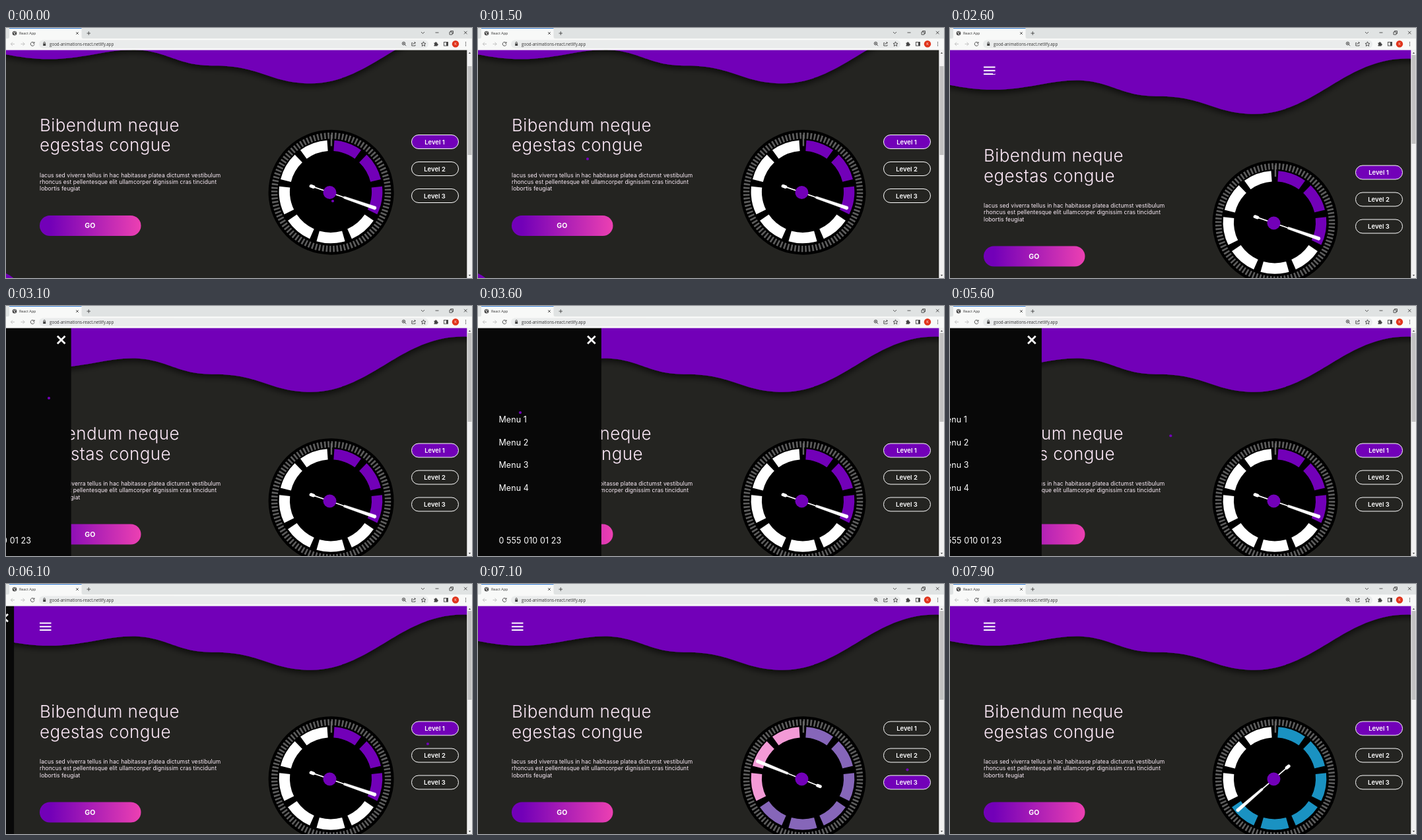
An HTML page for the animation above (8000 ms loop, 706 px wide and 380 px high).

```html
<!DOCTYPE html>
<html lang="en">
<head>
<meta charset="utf-8">
<title>React App</title>
<style>
  html, body { margin: 0; width: 100%; height: 100%; overflow: hidden; background: #242421; }
  svg { display: block; width: 706px; height: 380px; font-family: Inter, "Open Sans", sans-serif; }
  .ui { font-family: "Open Sans", "Noto Sans", sans-serif; }
  .line { fill: none; stroke: #444; stroke-width: .9; }
  .mid { text-anchor: middle; fill: #fff; }
</style>
</head>
<body>
<svg viewBox="0 0 706 380">
  <defs>
    <linearGradient id="pink">
      <stop offset=".1" stop-color="#7200b8"/>
      <stop offset="1" stop-color="#ec40b2"/>
    </linearGradient>
    <filter id="shade" x="-5%" y="-5%" width="110%" height="140%">
      <feDropShadow dx="0" dy="5" stdDeviation="4" flood-color="#000" flood-opacity=".6"/>
    </filter>
  </defs>
  <rect width="706" height="380" fill="#242421"/>

  <g id="page">
    <path filter="url(#shade)" fill="#7200b8" transform="translate(0 .7)" d="M-10 20V84L0 86C22 90 45 94 75 93C125 91 158 77 200 79C245 82 262 103 312 103C385 102 400 130 462 130C555 129 600 42 699 46L716 49V20Z"/>
    <path fill="#7200b8" d="M0 419.500Q8 423 13 428H0Z"/>
    <path stroke="#fff" stroke-width="2" d="M51 59.500H68.500M51 64.700H68.500M51 70H68.500"/>
    <g fill="#fde9f8" font-size="26" font-weight="300" letter-spacing=".4">
      <text x="51" y="203">Bibendum neque</text>
      <text x="51" y="233.500">egestas congue</text>
    </g>
    <g fill="#fdeffa" font-size="8.5" letter-spacing=".07">
      <text x="51" y="273">lacus sed viverra tellus in hac habitasse platea dictumst vestibulum</text>
      <text x="51" y="283.400">rhoncus est pellentesque elit ullamcorper dignissim cras tincidunt</text>
      <text x="51" y="293.800">lobortis feugiat</text>
    </g>
    <rect x="51" y="331.500" width="153.500" height="31" rx="15.500" fill="url(#pink)"/>
    <text class="mid" x="127.300" y="350.900" font-size="10.500" font-weight="700">GO</text>

    <circle cx="492.600" cy="296.200" r="95"/>
    <circle cx="492.600" cy="296.200" r="86" fill="none" stroke="#5c5c5c" stroke-width="9.500" pathLength="200" stroke-dasharray="1 1"/>
    <path d="M493 208.500V226" stroke="#666" stroke-width="2.400"/>
    <g id="segments" fill="none" stroke-width="16.300"></g>
    <g id="needle" stroke="#fff" stroke-linecap="round">
      <path d="M0 30V26" stroke-width="5"/>
      <path d="M0 28V-24" stroke-width="1.700"/>
      <path d="M-1.600 -23L-2.500 -73Q0 -76 2.500 -73L1.600 -23Z" fill="#fff" stroke-width=".5"/>
    </g>
    <circle cx="490.500" cy="296.500" r="10" fill="#7200b8"/>
    <g id="levels" font-size="9.500" font-weight="600"></g>
  </g>

  <g id="menu" fill="#fff" font-size="12.500">
    <rect y="33" width="191.500" height="347" fill="#080808"/>
    <path d="M170.700 45.700L182.300 57.300M182.300 45.700L170.700 57.300" stroke="#fff" stroke-width="2.800"/>
    <g id="items" letter-spacing=".1"></g>
    <text x="36" y="360.600" letter-spacing=".1">0 555 010 01 23</text>
  </g>

  <g id="cursor">
    <circle r="2.100" fill="#7200b8"/>
    <text id="hint" x="4" y="5.400" font-size="6.400" fill="#fff">GO</text>
  </g>

  <g class="ui">
    <rect width="706" height="33.600" fill="#f8f9f8"/>
    <rect width="706" height="16" fill="#e0e3e3"/>
    <path d="M3 16Q5 16 5 13V0H114.500V13Q114.500 16 117 16Z" fill="#f8f9f8"/>
    <path d="M5 .5H114.500" stroke="#3b82d8"/>
    <circle cx="13" cy="8" r="3.300" fill="#444"/>
    <path d="M11 6.500L13 7.200L12.500 9L14.500 10M13.500 5.500L15 7" stroke="#fff" stroke-width=".9" fill="none"/>
    <text x="20" y="10" font-size="5.400" fill="#333">React App</text>
    <path class="line" d="M106.200 6.200L109.800 9.800M109.800 6.200L106.200 9.800M122.500 8H128M125.250 5.200V10.700"/>
    <path class="line" d="M629 6L631.500 8.500L634 6M650.500 7H655.500M672 6H676V10H672ZM673.500 6V4.500H677.500V8.500H676M694 4.800L698.500 9.300M698.500 4.800L694 9.300"/>
    <path class="line" style="stroke:#bbb" d="M13 24.300H7.500M10 21.600L7.300 24.300L10 27M22.500 24.300H28M25.500 21.600L28.200 24.300L25.500 27"/>
    <path class="line" d="M42.300 22.400A2.900 2.900 0 1 0 43 24.700M43 21V23.200H40.700"/>
    <rect x="50" y="18.300" width="590" height="12.400" rx="6.200" fill="#eaecec"/>
    <rect x="56.200" y="23.500" width="4" height="3.500" fill="#444"/>
    <path class="line" d="M57 23.500V22.500A1.200 1.200 0 0 1 59.400 22.500V23.500"/>
    <text x="66" y="26.500" font-size="6.200" fill="#333">good-animations-react.netlify.app</text>
    <circle class="line" cx="602.500" cy="23.500" r="2.300"/>
    <path class="line" d="M604.200 25.200L606.200 27.200M601.300 23.500H603.700M602.500 22.300V24.700"/>
    <path class="line" d="M616 22.500H614.800V27H620V25.500M616.500 25Q617 22.500 620 22.500M618.800 21L620.500 22.500L618.800 24"/>
    <path class="line" d="M632.500 20.800L633.500 23.200L636 23.400L634.100 25L634.700 27.500L632.500 26.200L630.300 27.500L630.900 25L629 23.400L631.500 23.200Z"/>
    <path fill="#444" d="M648.500 22.500H650A1.300 1.300 0 0 1 652.600 22.500H653.500V24A1.300 1.300 0 0 1 653.500 26.600V27.500H648.500V26A1.200 1.200 0 0 0 648.500 23.800Z"/>
    <rect class="line" x="663.500" y="21.500" width="6" height="5.500"/>
    <path d="M667 21.500H669.500V27H667Z" fill="#444"/>
    <circle cx="681" cy="24.200" r="5.200" fill="#e0341c"/>
    <text class="mid" x="681" y="26.300" font-size="5.600">K</text>
    <path d="M696.500 21.700V27.500" stroke="#444" stroke-width="1.400" stroke-linecap="round" stroke-dasharray="0 2.500"/>
    <rect x="698.300" y="33" width="7.700" height="347" fill="#f1f1f1"/>
    <path d="M700.800 39L702.500 36.800L704.200 39ZM700.800 375L702.500 377.200L704.200 375Z" fill="#555"/>
    <rect id="thumb" x="699.500" width="6" height="135" fill="#c1c1c1"/>
  </g>
</svg>
<script>
const $ = id => document.getElementById(id);
const PURPLE = '#7200b8';
const COLORS = ['', PURPLE, '#1a92c2', '#e83eb0'];
const clamp = v => Math.min(1, Math.max(0, v));
const mix = (a, b, k) => `color-mix(in srgb, ${b} ${k * 100}%, ${a})`;
const repeat = (n, make) => Array.from({ length: n }, (_, i) => make(i)).join('');

const bezier = (u, a, b) => 3 * u * (1 - u) ** 2 * a + 3 * u * u * (1 - u) * b + u ** 3;

// the CSS "ease" curve
function ease(x) {
  x = clamp(x);
  if (x === 0 || x === 1) return x;
  let lo = 0, hi = 1;
  for (let i = 0; i < 20; i++) {
    const mid = (lo + hi) / 2;
    if (bezier(mid, .25, .25) < x) lo = mid; else hi = mid;
  }
  return bezier(lo, .1, 1);
}

// time, x, y
const PATH = [
  [0, 495, 263], [100, 494, 264], [400, 340, 300], [700, 200, 306], [1000, 160, 266],
  [1500, 166, 199], [1850, 60, 62], [2500, 67, 69], [2800, 66, 66], [3100, 65, 140],
  [3600, 64, 162], [3900, 63, 173], [4150, 62, 207], [4400, 62, 242], [4650, 64, 277],
  [4750, 64, 277], [4950, 62, 207], [5080, 90, 170], [5350, 286, 190], [5450, 286, 190],
  [6100, 639, 243], [6350, 648, 262], [6450, 648, 262], [6800, 650, 302], [6950, 650, 302],
  [7250, 651, 263], [7400, 651, 263], [7800, 659, 227], [8000, 659, 227]
];
// time, level
const CLICKS = [[-1000, 1], [6420, 2], [6880, 3], [7340, 2], [7880, 1]];
const LAG = 120;

$('segments').innerHTML = repeat(9, i =>
  `<circle r="70.200" pathLength="360" stroke-dasharray="32 328" transform="translate(492 295.400) rotate(${i * 40 - 86})"/>`);
$('levels').innerHTML = repeat(3, i =>
  `<rect x="614.500" y="${209 + i * 41}" width="71" height="21" rx="10.500" stroke="#fff"/>
   <text class="mid" x="649.500" y="${223 + i * 41}">Level ${i + 1}</text>`);
const itemY = i => 177 + i * 34.6;
$('items').innerHTML = repeat(4, i => `<text x="36" y="${itemY(i)}">Menu ${i + 1}</text>`);

const segments = [...$('segments').children];
const buttons = $('levels').querySelectorAll('rect');
const items = [...$('items').children];

function pointer(t) {
  const n = PATH.findIndex(p => p[0] > t);
  const [t0, x0, y0] = PATH[n - 1], [t1, x1, y1] = PATH[n];
  const u = (t - t0) / (t1 - t0), k = u * u * (3 - 2 * u);
  return [x0 + (x1 - x0) * k, y0 + (y1 - y0) * k];
}

function drawGauge(t) {
  const last = time => CLICKS.filter(c => c[0] <= time).length - 1;
  const active = CLICKS[last(t)][1];
  buttons.forEach((b, i) => b.setAttribute('fill', i + 1 === active ? PURPLE : '#242421'));

  const n = last(t - LAG), [start, to] = CLICKS[n];
  const from = CLICKS[Math.max(0, n - 1)][1];
  const k = ease((t - LAG - start) / 330);
  const color = (level, i) => i < level * 3 ? COLORS[level] : '#ffffff';
  segments.forEach((s, i) => s.style.stroke = mix(color(from, i), color(to, i), k));
  const angle = 109 + 120 * (from + (to - from) * k - 1);
  $('needle').setAttribute('transform', `translate(490.500 296.500) rotate(${angle})`);
}

function draw(t) {
  const scroll = 1 - ease((t - 2050) / 300);
  $('page').setAttribute('transform', `translate(0 ${-46.5 * scroll})`);
  $('thumb').setAttribute('y', 41 + 17 * scroll);

  const open = ease((t - 2800) / 1000) - ease((t - 5410) / 1000);
  $('menu').setAttribute('transform', `translate(${191.5 * (open - 1)} 0)`);

  const [x, y] = pointer(t);
  $('cursor').setAttribute('transform', `translate(${x} ${y})`);
  let hover = 0;
  items.forEach((item, i) => {
    const near = x < 90 && open > .9 ? clamp((10 - Math.abs(y - itemY(i) + 4.5)) / 5) : 0;
    hover = Math.max(hover, near);
    item.setAttribute('transform', `rotate(${-10 * near} 36 ${itemY(i)})`);
    item.style.fill = mix('#ffffff', '#6400a0', near);
  });
  $('hint').setAttribute('opacity', hover > .5 ? 1 : 0);
  drawGauge(t);
}

const begin = performance.now();
function frame() {
  draw((performance.now() - begin) % 8000);
  requestAnimationFrame(frame);
}
frame();
</script>
</body>
</html>
```
